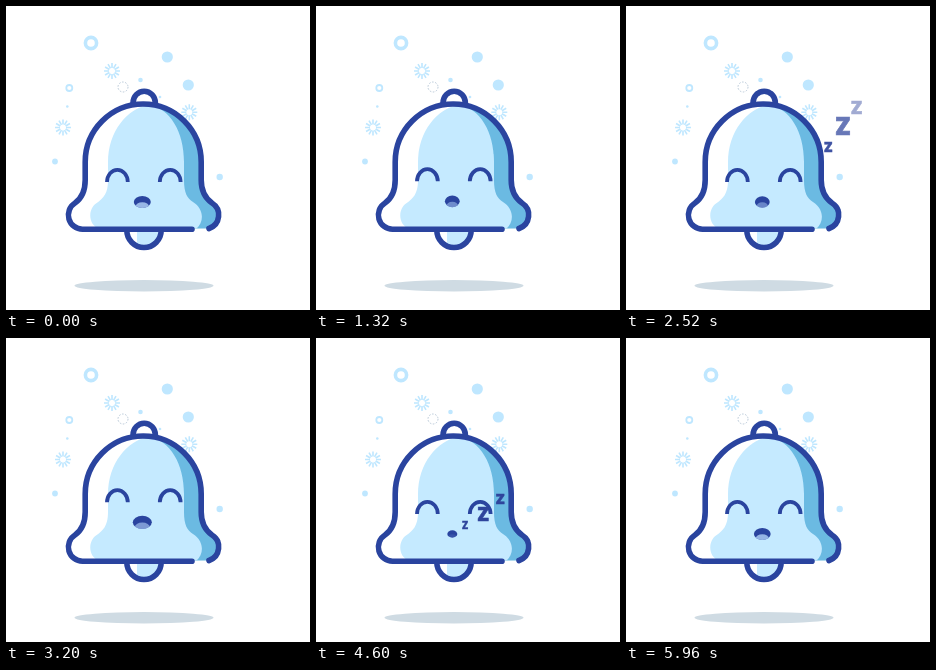
These frames come from a looping animation (304 px wide and 304 px high, 6000 ms). An HTML page:

```html
<!DOCTYPE html>
<html lang="en">
<head>
<meta charset="utf-8">
<title>Sleeping bell</title>
<style>
html, body { margin: 0; width: 100%; height: 100%; overflow: hidden; background: #fff; }
svg { display: block; width: 100vw; height: 100vh; }
.line { fill: none; stroke: #2a449f; stroke-width: 5.6; stroke-linecap: round; stroke-linejoin: round; }
.z { font: 800 10px "Open Sans", sans-serif; fill: #2f459c; stroke: #2f459c; stroke-width: .3; text-anchor: middle; }
</style>
</head>
<body>
<svg viewBox="0 0 304 304">
  <defs>
    <clipPath id="body"><path d="M76.500 223A14.200 14.200 0 0 1 69 197C76 192 79.200 185 79.200 174V156A58 58 0 0 1 195.200 156V174C195.200 185 199 192 206 197A14.200 14.200 0 0 1 203 222.500Z"/></clipPath>
    <clipPath id="lips"><ellipse id="lip"/></clipPath>
  </defs>

  <g id="decor" fill="#bfe7ff" stroke="#bfe7ff" stroke-width="0">
    <circle cx="85" cy="37" r="5.6" fill="none" stroke-width="3.6"/>
    <circle cx="63.300" cy="82" r="3" fill="none" stroke-width="1.8"/>
    <circle cx="117" cy="81" r="5" fill="none" stroke="#b9c9d8" stroke-width="1" stroke-dasharray="1.6 1.54"/>
    <circle cx="161.300" cy="51" r="5.600"/>
    <circle cx="182.300" cy="79" r="5.600"/>
    <circle cx="49" cy="155.500" r="2.900"/>
    <circle cx="213.700" cy="171" r="3.200"/>
    <circle cx="134.500" cy="74" r="2.300"/>
    <circle cx="61.300" cy="100.500" r="1.3"/>
    <circle cx="154" cy="91" r="1.3"/>
  </g>

  <ellipse cx="138" cy="279.700" rx="69.500" ry="5.700" fill="#cfdbe3"/>

  <path d="M131 224V241C145 244 155 236 155.200 224Z" fill="#c5eaff"/>
  <path class="line" d="M120.800 224.300A17.200 17.200 0 0 0 155.200 224.300"/>
  <path class="line" d="M127 97A11.200 11.800 0 0 1 149.400 97"/>

  <g clip-path="url(#body)">
    <path d="M55 95H220V226H55Z" fill="#fff"/>
    <path d="M137 95H220V226H137Z" fill="#6bbae2"/>
    <path d="M143 99C164 102 178 126 178 156V174C178 187 181 192 187 196C198 203 199 216 189 224H97C82 222 81 204 90 197.500C98 192 102 187 102 174V156C102 126 121 102 143 99Z" fill="#c5eaff"/>
  </g>
  <path class="line" d="M186 223.200H76.500A14.200 14.200 0 0 1 69 197C76 192 79.200 185 79.200 174V156A58 58 0 0 1 195.200 156V174C195.200 185 199 192 206 197A14.200 14.200 0 0 1 203 222.500"/>

  <g id="eyes">
    <path class="line" style="stroke-width:3.8;stroke-linecap:butt" d="M101 176A10.400 12.200 0 0 1 121.800 176M153.800 176A10.400 12.200 0 0 1 174.600 176"/>
  </g>
  <ellipse id="mouth" fill="#2a449f"/>
  <g clip-path="url(#lips)"><ellipse id="tongue" fill="#b4d4f8"/></g>
  <g id="zs"></g>
</svg>
<script>
const LOOP = 6000, BREATH = 2720;
const $ = id => document.getElementById(id);
const clamp = x => Math.min(1, Math.max(0, x));
const ease = x => (1 - Math.cos(Math.PI * clamp(x))) / 2;
const add = (parent, tag, attrs) => {
  const el = document.createElementNS("http://www.w3.org/2000/svg", tag);
  set(el, attrs);
  return parent.appendChild(el);
};
function set(el, attrs) {
  for (const k in attrs) el.setAttribute(k, attrs[k]);
}

// Linear interpolation over rows of [position, ...values]
function track(rows, x) {
  let i = 1;
  while (i < rows.length - 1 && x > rows[i][0]) i++;
  const a = rows[i - 1], b = rows[i], p = clamp((x - a[0]) / (b[0] - a[0]));
  return a.slice(1).map((v, j) => v + (b[j + 1] - v) * p);
}

for (const [x, y] of [[106, 65], [57, 121.5], [183.3, 106.3]]) {
  let d = "";
  for (let i = 0; i < 12; i++) {
    const c = Math.cos(i * Math.PI / 6), s = Math.sin(i * Math.PI / 6);
    d += `M${x + 3 * c} ${y + 3 * s}L${x + 8 * c} ${y + 8 * s}`;
  }
  add($("decor"), "path", { d, "stroke-width": 1.6 });
}

// time, half width, half height, tongue opacity
const mouthKeys = [
  [0, 8.5, 6, .8], [560, 9.5, 6.6, .6], [1320, 7.4, 5.8, .5], [1880, 5, 3.7, .1],
  [2520, 7.4, 5.8, .45], [3200, 9.5, 6.6, .6], [3280, 9.5, 6.6, .6], [4040, 7.4, 5.8, .5],
  [4600, 5, 3.7, .1], [5240, 6.2, 4.7, .45], [6000, 8.5, 6, .8]
];
const drift = [
  [137, 194], [150, 187], [168, 176], [184, 161],
  [203, 140], [215, 123.5], [230, 102], [250, 84]
];
const letters = [10.9, 15.4, 9.4].map((cap, i) => {
  const el = add($("zs"), "text", { class: "z" });
  el.textContent = "Z";
  return { el, cap, start: 1340 + 205 * i };
});

function draw(t) {
  const b = t < BREATH * 2 ? t % BREATH : BREATH;
  const lift = b < 600 ? ease(b / 560) : 1 - ease((b - 640) / 800);
  set($("eyes"), { transform: `translate(0 ${-12.3 * lift})` });

  const [rx, ry, tongue] = track(mouthKeys, t), cy = 196 - 12.3 * lift;
  for (const id of ["mouth", "lip"]) set($(id), { cx: 136.3, cy, rx, ry });
  set($("tongue"), { cx: 136.3, cy: cy + ry * .8, rx: rx * .8, ry: ry * .75, opacity: tongue });

  for (const { el, cap, start } of letters) {
    const age = t < start + BREATH ? t - start : t - start - BREATH;
    const u = age / 1500;
    const e = clamp(u) * (1.25 - .25 * clamp(u));
    const x = 137 + 113 * e, [y] = track(drift, x);
    const h = cap * (.7 + .6 * e), k = h / 7.14;
    const fade = clamp(u / .06) * clamp(1 - (Math.max(0, u - .4) / .56) ** 1.6);
    set(el, { transform: `translate(${x} ${y + h / 2}) scale(${k})`, opacity: fade });
  }
}

function frame() {
  draw(performance.now() % LOOP);
  requestAnimationFrame(frame);
}
frame();
</script>
</body>
</html>
```
